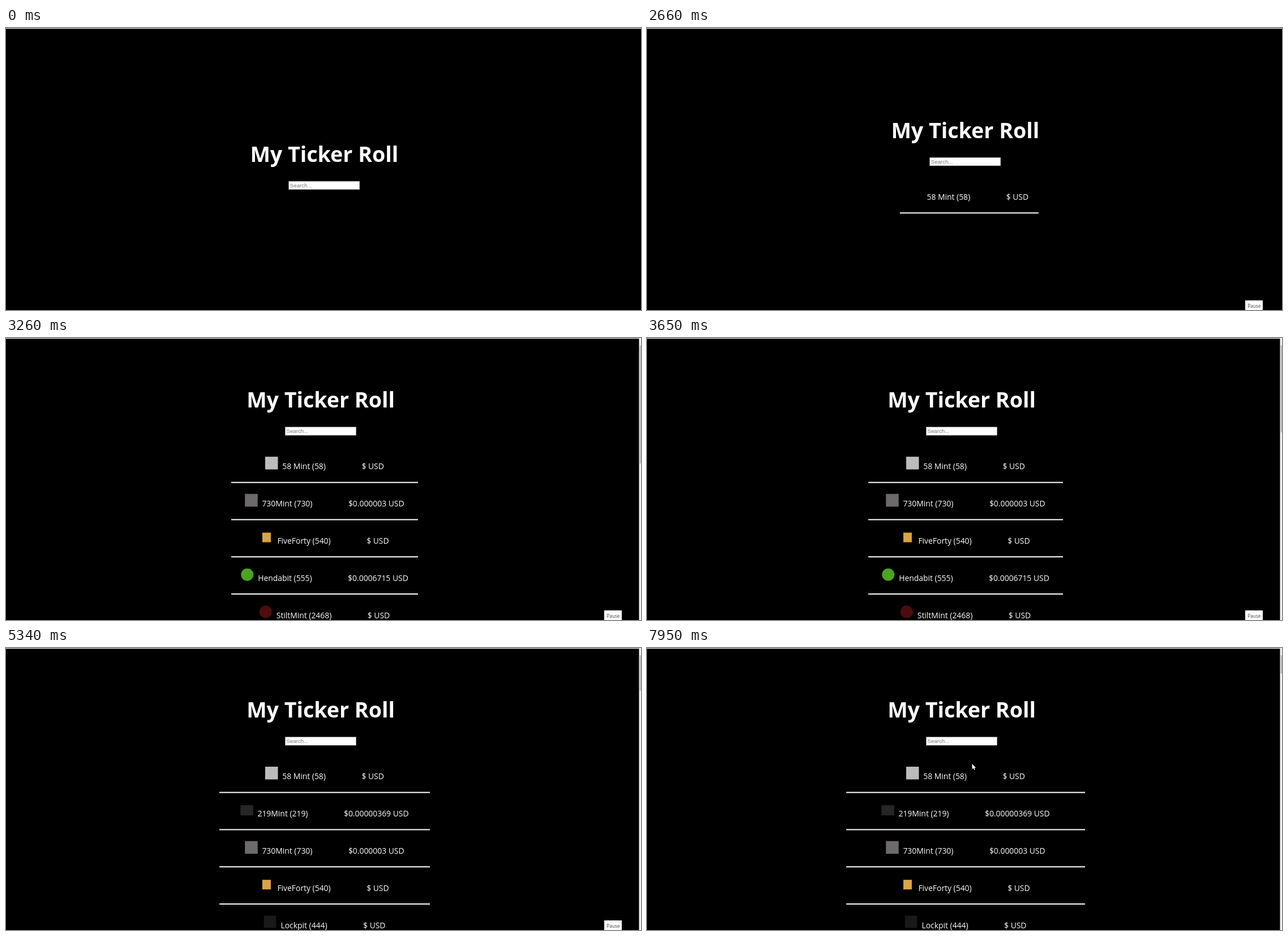
An HTML page for the animation above (8 s loop, 1122x499 px).

```html
<!DOCTYPE html>
<html lang="en">
<head>
<meta charset="utf-8">
<title>Coin list</title>
<style>
  html, body { margin: 0; width: 100%; height: 100%; overflow: hidden; background: #000; }
  svg { display: block; width: 1122px; height: 499px; fill: #fff; font: 13.9px "Open Sans", "Noto Sans", sans-serif; }
  .title { font-size: 37.6px; font-weight: 700; text-anchor: middle; }
  .hint { font: 9.7px "Liberation Sans", Arial, sans-serif; fill: #757575; }
  .pause { font-size: 8.2px; fill: #444; }
</style>
</head>
<body>
<svg id="stage" viewBox="0 0 1122 499"></svg>
<script>
const LOOP = 8000, FIRST = 2660, FILLED = 2720, MORE = 3260, FULL = 3980;
const PITCH = 65.8, VISIBLE = 5, ICON = 30, GAP = 63.5;
const stage = document.getElementById('stage');
const pen = document.createElement('canvas').getContext('2d');
pen.font = getComputedStyle(stage).font;
const widthOf = s => pen.measureText(s).width;

const rect = (x, y, w, h, fill, extra = '') =>
  `<rect x="${x}" y="${y}" width="${w}" height="${h}" fill="${fill}" ${extra}/>`;
const text = (x, y, s, cls = '') => `<text x="${x}" y="${y}" class="${cls}">${s}</text>`;

// Icons are drawn around a centre point.
const square = (fill, w = 22.5, h = w) => (x, y) => rect(x - w / 2, y - h / 2, w, h, fill);
const circle = fill => (x, y) => `<circle cx="${x}" cy="${y}" r="11" fill="${fill}"/>`;

// In display order; a coin joins the list once its price has arrived.
const coins = [
  { arrives: FIRST, name: '58 Mint (58)', price: '$ USD', icon: square('#bcbcbc') },
  { arrives: FULL, name: '219Mint (219)', price: '$0.00000369 USD', icon: square('#262626', 22.5, 18) },
  { arrives: FILLED, name: '730Mint (730)', price: '$0.000003 USD', icon: square('#6e6a6a') },
  { arrives: FILLED, name: 'FiveForty (540)', price: '$ USD', icon: square('#d9a441', 15, 17) },
  { arrives: FULL, name: 'Lockpit (444)', price: '$ USD', icon: square('#1a1818', 21.5) },
  { arrives: MORE, name: 'Hendabit (555)', price: '$0.0006715 USD', icon: circle('#4aa51c') },
  { arrives: FILLED, name: 'StiltMint (2468)', price: '$ USD', icon: circle('#4d0d0c') },
  { arrives: FILLED, name: 'RivetMint (2555)', price: '$ USD', icon: square('#333') }
];

// The list is as wide as its widest row, on screen or below it.
const listWidths = [[0, 245], [FILLED, 330], [3460, 344], [4680, 372], [5540, 422]];
const listWidth = t => listWidths.findLast(([start]) => start <= t)[1];

// The thumb shrinks as the page grows, quickly at first.
const thumbHeight = t => {
  const s = (t - FILLED) / 1000;
  return 1 / (.0024 + .0044 * s + .0014 * Math.max(0, s - 1.2));
};

const easeOut = (u, power) => 1 - (1 - u) ** power;
function pointer(t) {
  const step = 66, start = 7160;
  const u = Math.min(1, Math.floor((t - start) / step) * step / 790);
  return [1009 - 434.5 * easeOut(u, 4.4), 460 - 255 * easeOut(u, 6)];
}

function row(c, y, centre, width, withIcon) {
  const nameWidth = widthOf(c.name);
  const x = centre - (ICON + nameWidth + GAP + widthOf(c.price)) / 2;
  return (withIcon ? c.icon(x + 11, y - 11) : '') +
    text(x + ICON, y, c.name) + text(x + ICON + nameWidth + GAP, y, c.price) +
    rect(centre - width / 2, y + 22.3, width, 2, '#fff');
}

function scene(t) {
  const scrolls = t >= FILLED;
  const y = scrolls ? 123.3 : t >= FIRST ? 195 : 237;
  const middle = scrolls ? 556 : 562.3;
  const shown = coins.filter(c => c.arrives <= t).slice(0, VISIBLE);
  let out = rect(0, 0, 1122, 499, '#000') + rect(0, 0, 1122, 1.2, '#ececec');

  out += text(middle, y, 'My Ticker Roll', 'title');
  out += rect(middle - 62.7, y + 34.2, 125.2, 14.6, '#fff', 'stroke="#999" stroke-width=".6"');
  out += text(middle - 60.5, y + 45, 'Search...', 'hint');
  shown.forEach((c, i) => out += row(c, y + 109 + i * PITCH, middle + 7, listWidth(t), scrolls));

  if (scrolls) {
    out += rect(1118.5, 0, 3.5, 499, '#f1f1f1');
    out += rect(1119.7, 13, 2.3, thumbHeight(t), '#bdbdbd');
  }
  const alpha = Math.min(1, (t - 1130) / 130, (7300 - t) / 200);
  if (alpha > 0 && t >= 1190) {
    out += `<g opacity="${alpha}">${rect(1057, 482, 31, 17, '#fff')}${text(1061.3, 495.3, 'Pause', 'pause')}</g>`;
  }
  if (t >= 7160) {
    out += `<path transform="translate(${pointer(t)})" d="M0 0V9.5L2.2 7.6 3.8 11 5.2 10.3 3.7 7H6.6Z"/>`;
  }
  return out;
}

function frame() {
  stage.innerHTML = scene(performance.now() % LOOP);
  requestAnimationFrame(frame);
}
frame();
</script>
</body>
</html>
```
